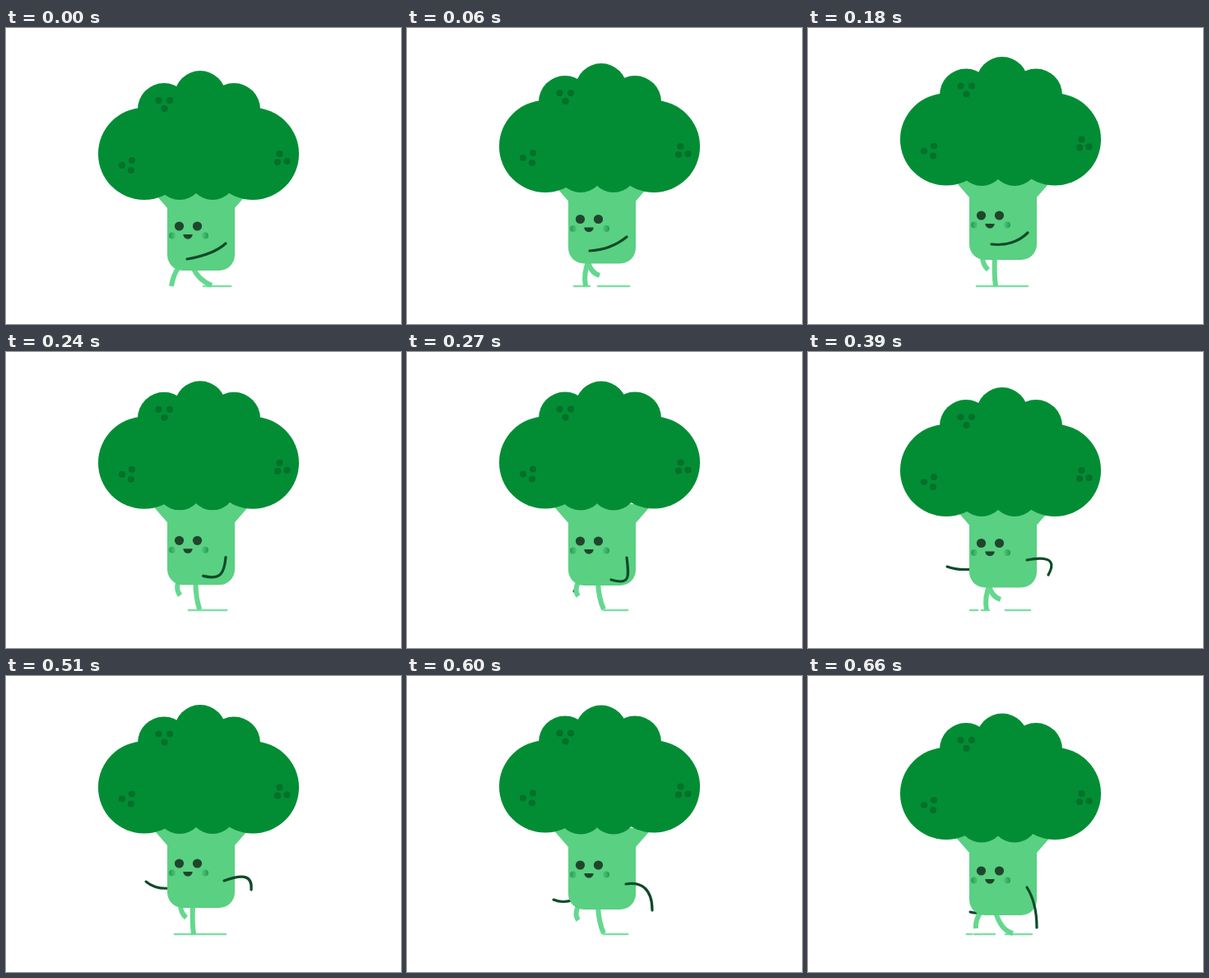
Animation, 480 px wide and 360 px high, one loop 690 ms. Source, as an HTML page with a canvas:

```html
<!DOCTYPE html>
<html lang="en">
<head>
<meta charset="utf-8">
<title>Walking broccoli</title>
<style>
  html, body { margin: 0; width: 100%; height: 100%; overflow: hidden; background: #fff; }
  canvas { display: block; }
</style>
</head>
<body>
<canvas id="stage" width="480" height="360"></canvas>
<script>
const ctx = document.getElementById('stage').getContext('2d');
const LOOP = 690, STEP = 330;
const CROWN = '#028d35', SPOT = '#04702a', STALK = '#5ad082', LEG = '#64d88f', DARK = '#0f4a28', EYE = '#20452d';

// Each pose is held until the next start time; ground marks are x ranges.
const poses = [
  { at: 0, ground: [[240, 273]] },
  { at: 30, ground: [[200, 215], [236, 272]] },
  { at: 60, ground: [[203, 222], [232, 270]] },
  { at: 180, ground: [[205, 267]] },
  { at: 240, ground: [[222, 268]] },
  { at: 270, ground: [[239, 268]] },
  { at: 330, ground: [[240, 273]] },
  { at: 390, ground: [[197, 206], [211, 220], [240, 270]] },
  { at: 510, ground: [[205, 267]] },
  { at: 540, ground: [[205, 267]] },
  { at: 600, ground: [[239, 268]] },
  { at: 660, ground: [[193, 199], [202, 227], [240, 272]] }
];

// Keys: time, then the values. Bounce and legs repeat on every step.
const bounce = [ // lobes, centre of the crown, stalk
  [0, 0, 0, 0],
  [60, -9, -9, -8.5],
  [180, -17.5, -17, -13],
  [270, -18.5, -16.5, -11],
  [330, -10, -6.5, -4]
];
const plantedLeg = [ // hip x, knee, foot
  [0, 210, 203, 300, 201, 314],
  [60, 221, 214, 298, 217, 314],
  [180, 227, 226, 300, 228, 314],
  [270, 232, 233, 300, 239, 313],
  [330, 228, 234, 309, 249, 313]
];
const swingLeg = [
  [0, 227, 234, 307, 250, 313],
  [60, 220, 222, 297, 234, 301],
  [180, 212, 212, 288, 219, 294],
  [270, 208, 203, 290, 208, 297],
  [330, 210, 203, 297, 204, 307]
];
const frontArm = [ // shoulder, two curve handles, hand
  [0, 267, 262, 256, 272, 238, 278, 220, 281],
  [60, 267, 254, 256, 263, 240, 270, 222, 271],
  [180, 267, 249, 256, 260, 240, 265, 223, 263],
  [270, 267, 250, 270, 274, 271, 284, 248, 277],
  [330, 267, 259, 277, 268, 288, 270, 277, 290],
  [390, 266, 253, 286, 249, 304, 250, 292, 271],
  [510, 265, 249, 284, 242, 300, 240, 298, 260],
  [600, 266, 253, 284, 250, 298, 258, 298, 285],
  [660, 266, 257, 273, 268, 278, 285, 278, 306]
];
const backArm = [ // shoulder, elbow, hand
  [0, 220, 260, 220, 265, 220, 270],
  [240, 220, 260, 220, 265, 220, 270],
  [270, 214, 262, 212, 280, 203, 291],
  [330, 205, 270, 195, 285, 180, 284],
  [390, 200, 264, 182, 266, 169, 261],
  [510, 200, 258, 182, 260, 170, 250],
  [600, 202, 272, 190, 277, 178, 272],
  [660, 214, 285, 208, 290, 197, 287]
];

function sample(track, t) {
  const i = Math.max(1, track.findIndex(key => key[0] >= t));
  const a = track[i - 1], b = track[i];
  const k = (t - a[0]) / (b[0] - a[0]);
  return a.slice(1).map((v, n) => v + (b[n + 1] - v) * k);
}

function disc(x, y, r, fill) {
  ctx.fillStyle = fill;
  ctx.beginPath();
  ctx.arc(x, y, r, 0, 2 * Math.PI);
  ctx.fill();
}

function curve(points, width, color, cap) {
  const [x, y, ...rest] = points;
  ctx.lineWidth = width;
  ctx.strokeStyle = color;
  ctx.lineCap = cap;
  ctx.beginPath();
  ctx.moveTo(x, y);
  if (rest.length === 6) ctx.bezierCurveTo(...rest);
  else ctx.quadraticCurveTo(...rest);
  ctx.stroke();
}

function drawLeg(track, t, dy) {
  const [hip, ...rest] = sample(track, t);
  curve([hip, 291 + dy, ...rest], 6, LEG, 'butt');
}

function drawStalk(dy) {
  ctx.fillStyle = STALK;
  ctx.beginPath();
  ctx.moveTo(176, 196 + dy);
  ctx.lineTo(196, 219 + dy);
  ctx.arcTo(196, 295 + dy, 236, 295 + dy, 19);
  ctx.arcTo(278, 295 + dy, 278, 219 + dy, 19);
  ctx.lineTo(278, 219 + dy);
  ctx.lineTo(298, 196 + dy);
  ctx.fill();
}

function drawFace(dy) {
  for (const side of [-1, 1]) {
    disc(221.5 + side * 11, 241 + dy, 5.6, EYE);
    const x = 222 + side * 20;
    const blush = ctx.createLinearGradient(x + side * 4, 0, x - side * 4, 0);
    blush.addColorStop(0, '#239c53');
    blush.addColorStop(1, '#50c67a');
    disc(x, 252.5 + dy, 4, blush);
  }
  ctx.fillStyle = EYE;
  ctx.beginPath();
  ctx.arc(221, 251 + dy, 5.7, 0, Math.PI);
  ctx.fill();
}

function drawCrown(lobes, centre) {
  for (const x of [168, 300]) disc(x, 153 + lobes, 56, CROWN);
  for (const x of [192, 277]) disc(x, 99 + lobes, 32, CROWN);
  ctx.fillRect(168, 100 + lobes, 132, 87);
  disc(236, 83.5 + centre, 31.5, CROWN);
  for (const x of [211, 251]) disc(x, 180 + centre, 29, CROWN);
  const spots = [
    [185.5, 88], [199, 88], [192.5, 98],
    [141, 167], [153, 161], [152, 173],
    [332.5, 153], [330, 163], [341.5, 162]
  ];
  for (const [x, y] of spots) disc(x, y + lobes, 4.1, SPOT);
}

function draw(now) {
  const time = now % LOOP;
  const { at, ground } = poses.findLast(pose => pose.at <= time);
  const phase = at > STEP ? at - STEP : at;
  const [lobes, centre, stalk] = sample(bounce, phase);

  ctx.fillStyle = '#fff';
  ctx.fillRect(0, 0, 480, 360);
  for (const [from, to] of ground) curve([from, 314, from, 314, to, 314], 2.6, '#7fdfa6', 'round');
  curve(sample(backArm, at), 3, DARK, 'round');
  drawLeg(plantedLeg, phase, stalk);
  drawLeg(swingLeg, phase, stalk);
  drawStalk(stalk);
  drawFace(stalk);
  curve(sample(frontArm, at), 3.2, DARK, 'round');
  drawCrown(lobes, centre);
  requestAnimationFrame(() => draw(performance.now()));
}

draw(performance.now());
</script>
</body>
</html>
```
